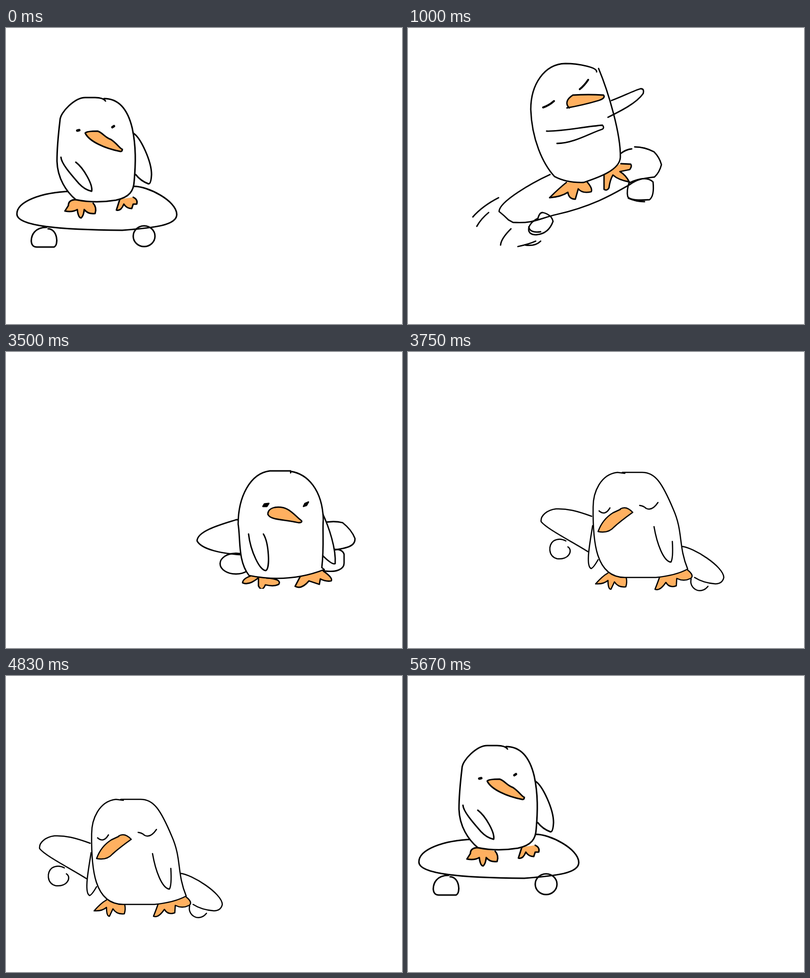
An HTML page that plays this animation: 800x600 px, repeating every 5.76 s.

```html
<!DOCTYPE html>
<html lang="en">
<head>
<meta charset="utf-8">
<title>Skating bird</title>
<style>
  html, body { margin: 0; width: 100%; height: 100%; overflow: hidden; background: #fff; }
  svg { display: block; width: 100vw; height: 100vh; overflow: hidden; }
  #reel, defs { fill: none; stroke: #000; stroke-width: 2.8; stroke-linecap: round; stroke-linejoin: round; }
  .white { fill: #fff; }
  .orange { fill: #ffb060; }
  .dot { fill: #000; }
  .thin { stroke-width: 2.5; }
  .thick { stroke-width: 3; }
  .bold { stroke-width: 4; }
  .blob { stroke-width: 5; }

  /* Scenes lie side by side, 800 apart; the reel jumps from one to the next. */
  #reel { animation: reel 5760ms step-end infinite; }
  @keyframes reel {
    0% { transform: translateX(0); }
    14.4% { transform: translateX(-800px); }
    15.88% { transform: translateX(-1600px); }
    17.36% { transform: translateX(-2400px); }
    21.7% { transform: translateX(-3200px); }
    30.38% { transform: translateX(-4000px); }
    60.76% { transform: translateX(-4800px); }
    65.1% { transform: translateX(-5600px); }
    73.78% { transform: translateX(-6400px); }
    83.85% { transform: translateX(-7200px); }
    92.53% { transform: translateX(-8000px); }
    98.43%, 100% { transform: translateX(0); }
  }
</style>
</head>
<body>
<svg viewBox="0 0 800 600">
  <defs>
    <clipPath id="floor"><rect width="800" height="480"/></clipPath>

    <g id="start-board" class="thick">
      <path d="M132 331C70 333 22 352 22 377C22 402 110 409 235 410C300 405 345 400 345 378C345 350 285 320 258 321"/>
      <path d="M82 404C58 404 51 420 51 432Q52 444 62 444H97C107 440 104 407 85 407"/>
      <ellipse cx="279" cy="422" rx="22" ry="21"/>
    </g>
    <g id="start-bird" class="thick">
      <g class="orange">
        <path d="M141 348Q126 348 126 360L119 371Q134 374 144 368Q146 385 152 385Q157 380 158 368Q166 378 180 376Q184 364 176 355"/>
        <path d="M230 347L223 369Q232 372 238 357Q244 366 254 366L257 357H264Q267 348 257 343"/>
      </g>
      <path class="white" d="M201 148Q196 141 180 141H160C140 141 109 170 109 188C104 230 103 250 103 270C104 305 122 332 141 348Q180 356 222 349C250 343 258 330 259 310C262 275 263 240 255 203C246 165 228 143 198 143"/>
      <path d="M257 213C272 222 294 270 294 297Q293 316 288 316Q272 310 262 297"/>
      <path d="M111 262C112 276 135 301 147 315Q159 328 173 331C176 318 157 284 141 272"/>
      <path class="blob" d="M144 208L148 207M215 201L218 199"/>
      <path class="orange" d="M160 213Q163 209 185 209C195 212 200 222 212 226C224 234 230 244 235 246Q235 251 230 250C200 244 168 230 160 213Z"/>
    </g>

    <g id="jump">
      <path d="M287 297C250 314 184 352 184 372Q193 379 203 389L212 394C255 397 268 385 300 378C380 360 425 330 447 318C465 305 480 304 498 302Q508 293 512 277Q508 262 497 251Q478 241 458 241M452 245Q440 246 429 255"/>
      <path d="M447 312Q441 330 444 342Q450 351 488 348Q498 340 495 312Q480 298 447 314M445 345Q460 352 478 352"/>
      <path d="M262 388Q265 374 272 374Q290 378 293 392Q284 417 260 419C238 421 238 398 262 386M244 403Q246 416 268 413"/>
      <g class="orange">
        <path d="M320 313Q305 325 286 344Q310 342 323 333Q325 347 338 347L344 326Q352 336 370 332Q374 326 361 311"/>
        <path d="M396 293V327Q402 331 406 324Q408 308 414 298Q425 308 447 312Q440 298 428 291L448 287Q453 280 450 276L430 275"/>
      </g>
      <path class="white" d="M381 89C383 80 345 72 318 72C275 73 248 115 248 165C250 225 272 275 296 301Q320 314 355 313C385 303 428 288 429 262C430 215 405 130 385 82"/>
      <path d="M411 147C435 138 456 127 470 123Q478 123 475 133C462 152 430 168 404 181"/>
      <path d="M280 209C310 210 355 200 393 197Q397 202 393 205C370 212 335 234 301 234"/>
      <path class="bold" d="M273 161Q285 157 295 148M347 124Q356 117 364 105"/>
      <path class="orange" d="M326 162C318 155 319 145 333 136Q365 134 395 136Q400 142 385 147Q355 156 321 162"/>
    </g>

    <g id="end-board">
      <path d="M488 340H465C440 348 386 362 386 383C394 398 430 411 500 412C590 409 620 408 650 403C690 398 706 394 705 378Q698 360 680 346"/>
      <ellipse cx="464.5" cy="429" rx="32" ry="21"/>
      <path d="M637 404C620 420 620 440 645 444C668 447 683 440 683 428V410Q680 400 665 400Q645 399 637 404"/>
    </g>
    <path id="board-edge" d="M680 346Q668 336 655 332"/>
    <g id="end-bird">
      <g class="orange">
        <path d="M506 359Q487 365 487 374Q500 380 521 362"/>
        <path d="M519 362V380Q526 394 533 378Q550 382 560 377Q567 366 535 364"/>
        <path d="M604 360L593 381Q606 388 621 370L642 377L644 366Q656 372 666 370Q670 364 650 350"/>
      </g>
      <path class="white" d="M648 232C662 262 676 305 674 335Q668 338 648 318"/>
      <path class="white" d="M584 151V147H542C502 152 478 200 478 255C483 285 477 330 500 359Q580 375 652 347L647 343C652 300 648 270 650 245C648 185 618 153 584 148"/>
      <path d="M499 275C503 310 522 350 534 349C543 344 540 293 529 275"/>
      <path class="orange" d="M538 235Q538 224 552 221C580 217 590 236 606 248Q608 252 600 252C570 245 543 247 538 235Z"/>
    </g>
    <path id="glare" class="dot" d="M528 219L531 214L540 213L536 219ZM610 219L613 213L620 210L616 217Z"/>

    <g id="walk-bird" class="thin">
      <g class="orange">
        <path d="M203 454Q192 460 178 476Q194 477 203 469Q203 487 209 487L216 472Q224 484 239 482Q242 473 240 464"/>
        <path d="M308 460Q304 472 298 487Q308 491 320 473Q327 485 341 480L342 465Q356 472 370 465Q378 459 364 448"/>
      </g>
      <path class="white" d="M172 358C167 390 157 440 169 445Q174 443 183 427"/>
      <path class="white" d="M237 252L222 250C188 254 173 290 173 320C172 390 178 463 237 463H300Q340 459 364 446C345 400 355 370 335 325C312 270 298 250 272 250H232"/>
      <path d="M296 360C302 395 315 430 330 432Q335 425 333 390"/>
      <path d="M185 328Q197 339 207 322M267 317Q275 318 280 323Q292 329 304 311"/>
      <path class="orange" d="M228 324Q240 317 253 331Q228 349 215 361Q204 374 183 370Q192 345 213 332L228 325"/>
    </g>
    <g id="walk" class="thin">
      <path d="M170 339C140 328 120 323 98 324C80 326 66 338 68 350C80 365 130 390 163 411"/>
      <path d="M352 400C375 402 436 440 437 463Q434 476 420 476Q395 474 378 463"/>
      <path d="M118 389Q105 382 93 389C82 397 82 420 100 425C124 428 133 408 122 401M371 466C366 485 390 500 405 481"/>
      <use href="#walk-bird"/>
    </g>

    <g id="stride" class="thin">
      <path d="M231 310C200 298 170 299 165 302Q145 308 133 318Q130 328 140 332C170 350 205 362 218 369Q224 375 238 379"/>
      <path d="M384 375C415 375 490 435 496 468Q496 486 480 485Q455 482 417 469M424 460Q405 461 392 452"/>
      <path d="M172 348C152 343 144 358 146 367C158 376 190 374 189 364M412 463C392 464 395 482 405 486C420 493 442 491 446 484"/>
      <g class="orange">
        <path d="M273 461Q256 467 245 476Q270 474 293 473"/>
        <path d="M297 473Q282 478 269 489Q292 489 308 484Q309 499 316 499L327 480Q340 488 352 483L355 470"/>
        <path stroke="#ffb060" d="M246 321H256V329H248"/>
        <path d="M253 320Q250 313 244 310C225 313 198 327 189 340Q222 335 250 330"/>
      </g>
      <path d="M355 283C335 270 320 248 300 248C268 249 236 275 239 308M240 335C235 370 242 440 275 462Q290 472 315 472"/>
      <path d="M357 289C375 325 385 360 398 400Q400 410 401 430Q398 452 375 462Q350 466 330 470"/>
      <path d="M305 349C315 385 320 450 350 466Q353 430 363 390V375M261 304C266 319 286 319 294 312"/>
    </g>
  </defs>

  <g id="reel">
    <g>
      <use href="#start-board"/><use href="#start-bird"/>
    </g>
    <g>
      <g transform="translate(30 -10) rotate(-8 77 440)"><use href="#start-board"/><use href="#start-bird"/></g>
    </g>
    <g>
      <use href="#jump" x="-40" y="20"/>
    </g>
    <g>
      <use href="#jump"/>
      <path d="M183 344Q150 361 131 383M163 374Q148 386 139 402M208 407Q188 427 187 440M222 443Q245 438 258 432M237 440Q257 443 268 432"/>
    </g>
    <g>
      <use href="#end-board"/><use href="#end-bird"/><use href="#board-edge"/>
      <path class="bold" d="M527 220L541 212M609 220L621 210"/>
      <path d="M414 438Q418 451 431 455M688 324Q698 326 702 333"/>
    </g>
    <g>
      <use href="#end-board"/><use href="#end-bird"/><use href="#board-edge"/><use href="#glare"/>
    </g>
    <g>
      <use href="#end-board"/>
      <path d="M680 346Q660 341 638 347"/>
      <g clip-path="url(#floor)"><use href="#end-bird" x="-9" y="94"/><use href="#glare" x="-9" y="94"/></g>
    </g>
    <g>
      <use href="#walk" x="201" y="-6"/>
    </g>
    <g>
      <use href="#stride"/>
    </g>
    <g>
      <use href="#walk"/>
    </g>
    <g>
      <use href="#start-board" x="-7"/><use href="#walk-bird" x="-60" y="-25"/>
    </g>
  </g>
</svg>
<script>
  const scenes = document.getElementById('reel').children;
  [...scenes].forEach((scene, i) => scene.setAttribute('transform', `translate(${800 * i})`));
</script>
</body>
</html>
```
